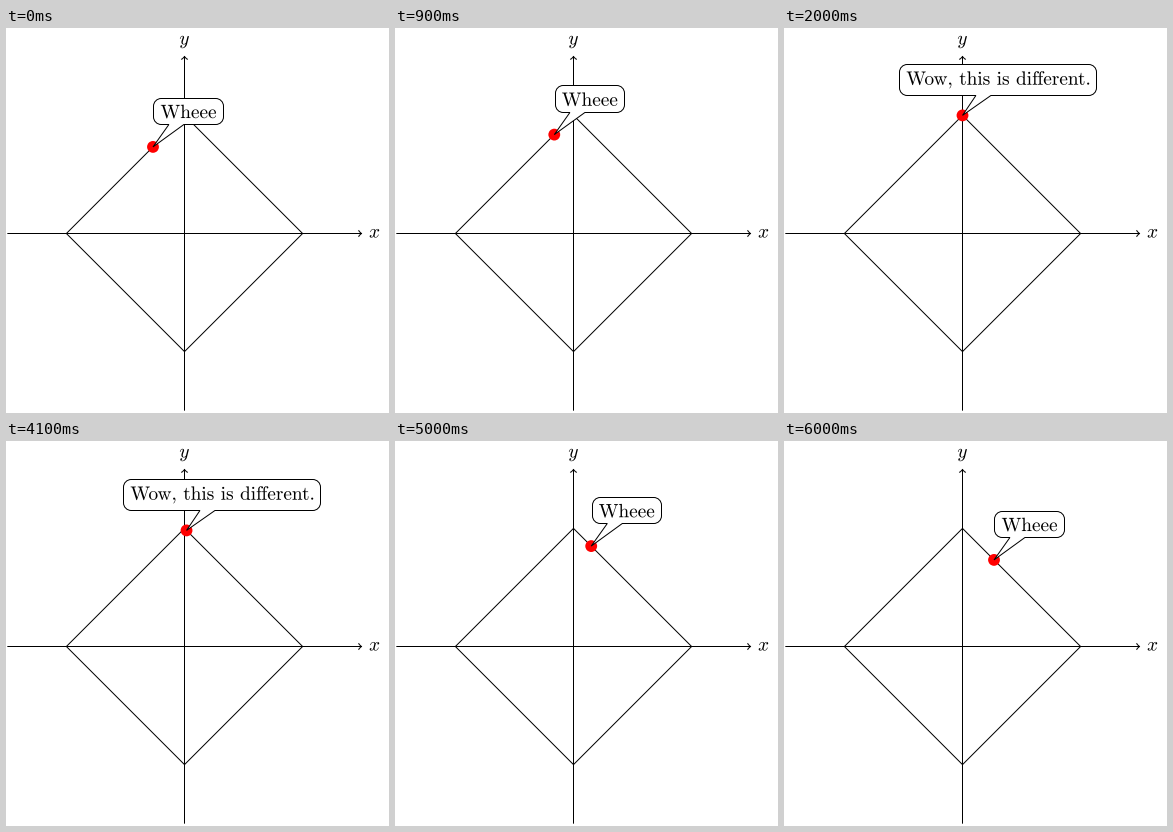
A matplotlib script that plays this animation: 383 px wide and 385 px high, repeating every 6.1 s.

```python
import math

import matplotlib.pyplot as plt
from matplotlib.animation import FuncAnimation
from matplotlib.patches import Circle, PathPatch
from matplotlib.path import Path
from matplotlib.textpath import TextPath
from matplotlib.transforms import Affine2D

plt.rcParams["mathtext.fontset"] = "cm"

W, H, DPI = 383, 385, 100
UNIT = 39.37                 # pixels per drawing unit
CX, CY = 178.5, 205.5        # origin of the plot
RADIUS = 3 * UNIT
REACH = 4.5 * UNIT
FONT = 19.25                 # height of ten-point type in pixels
PT = FONT / 10
PAD = 6.6
ROUND = 4 * PT
LINE = 72 / DPI              # one pixel

# Small negative spaces are the kerns that math mode leaves out
SHORT = r"$\mathrm{Wheee}$"
LONG = (r"$\mathrm{W\hspace{-0.095}o\hspace{-0.032}w,\hspace{0.18}this"
        r"\hspace{0.38}is\hspace{0.38}"
        r"dif\hspace{-0.032}feren\hspace{-0.032}t.}$")

fig = plt.figure(figsize=(W / DPI, H / DPI), dpi=DPI, facecolor="white")
ax = fig.add_axes([0, 0, 1, 1])
ax.set_xlim(0, W)
ax.set_ylim(H, 0)
ax.axis("off")


def glyphs(text):
    """Outline of a text, y pointing down, baseline at 0, left ink edge at 0."""
    path = TextPath((0, 0), text, size=FONT)
    left = path.get_extents().x0
    return path.transformed(Affine2D().translate(-left, 0).scale(1, -1))


def moved(path, x, y):
    return path.transformed(Affine2D().translate(x, y))


def fill_text(path, z=1):
    patch = PathPatch(path, facecolor="black", linewidth=0, zorder=z)
    return ax.add_patch(patch)


def line(points):
    xs, ys = zip(*points)
    ax.plot(xs, ys, color="black", lw=LINE, zorder=1, snap=False,
            solid_capstyle="butt")


def arrow_head(x, y, turn):
    pts = [(-3.75, 4), (-3.5, 2.5), (-0.75, 0.25), (0, 0),
           (-0.75, -0.25), (-3.5, -2.5), (-3.75, -4)]
    codes = [Path.MOVETO] + [Path.CURVE4] * 6
    place = Affine2D().scale(0.4 * PT).rotate_deg(turn).translate(x, y)
    head = Path(pts, codes).transformed(place)
    ax.add_patch(PathPatch(head, fill=False, lw=LINE, capstyle="round",
                           joinstyle="round"))


def crisp(v):
    return math.floor(v) + 0.5


def bubble(x, y, w, h):
    """Rounded box up and right of (x, y) with a pointer to that spot."""
    mx, my = x + 0.9 * UNIT, y - 0.9 * UNIT
    l, r = crisp(mx - w / 2), crisp(mx + w / 2)
    t, b = crisp(my - h / 2), crisp(my + h / 2)
    base = x + (y - b) + 1
    k = ROUND
    c = k * 0.45
    M, L, C = Path.MOVETO, Path.LINETO, Path.CURVE4
    steps = [
        (M, (base - 7.5, b)), (L, (x, y)), (L, (base + 7.5, b)),
        (L, (r - k, b)), (C, (r - c, b)), (C, (r, b - c)), (C, (r, b - k)),
        (L, (r, t + k)), (C, (r, t + c)), (C, (r - c, t)), (C, (r - k, t)),
        (L, (l + k, t)), (C, (l + c, t)), (C, (l, t + c)), (C, (l, t + k)),
        (L, (l, b - k)), (C, (l, b - c)), (C, (l + c, b)), (C, (l + k, b)),
        (Path.CLOSEPOLY, (base - 7.5, b)),
    ]
    return Path([p for _, p in steps], [code for code, _ in steps])


# Fixed part: axes, labels and the diamond
line([(CX - REACH, CY), (CX + REACH, CY)])
line([(CX, CY + REACH), (CX, CY - REACH)])
arrow_head(CX + REACH, CY, 0)
arrow_head(CX, CY - REACH, -90)
line([(CX + RADIUS, CY), (CX, CY - RADIUS), (CX - RADIUS, CY),
      (CX, CY + RADIUS), (CX + RADIUS, CY)])
fill_text(moved(glyphs("$x$"), CX + REACH + PAD + 1.4, CY + 4.1))
fill_text(moved(glyphs("$y$"), CX - 4.6, CY - REACH - PAD - 5.3))

# Moving part: dot, speech bubble and its words
dot = ax.add_patch(Circle((0, 0), 0.15 * UNIT, facecolor="red", lw=0,
                          zorder=2))
balloon = ax.add_patch(PathPatch(Path([(0, 0), (0, 0)]), facecolor="white",
                                 edgecolor="black", lw=LINE,
                                 joinstyle="miter", zorder=3))
words = fill_text(Path([(0, 0), (0, 0)]), 4)

ASCENT, DEPTH = 0.694 * FONT, 0.194 * FONT
SPEECH = {text: (glyphs(text), depth)
          for text, depth in ((SHORT, 0), (LONG, DEPTH))}

TOP, HOLD, FRAMES = 20, 20, 61


def draw(i):
    step = min(i, TOP) if i <= TOP + HOLD else i - HOLD
    degrees = 110 - step
    a = math.radians(degrees)
    r = RADIUS / (abs(math.cos(a)) + abs(math.sin(a)))
    x, y = CX + r * math.cos(a), CY - r * math.sin(a)

    path, depth = SPEECH[LONG if abs(degrees - 90) <= 1 else SHORT]
    ink, tall = path.get_extents().width, ASCENT + depth
    dot.center = (x, y)
    balloon.set_path(bubble(x, y, ink + 2 * PAD + 0.8, tall + 2 * PAD))
    words.set_path(moved(path, x + 0.9 * UNIT - ink / 2,
                         y - 0.9 * UNIT - tall / 2 + ASCENT))
    return dot, balloon, words


anim = FuncAnimation(fig, draw, frames=FRAMES, interval=100, repeat=True,
                     repeat_delay=0, blit=False)
plt.show()
```
